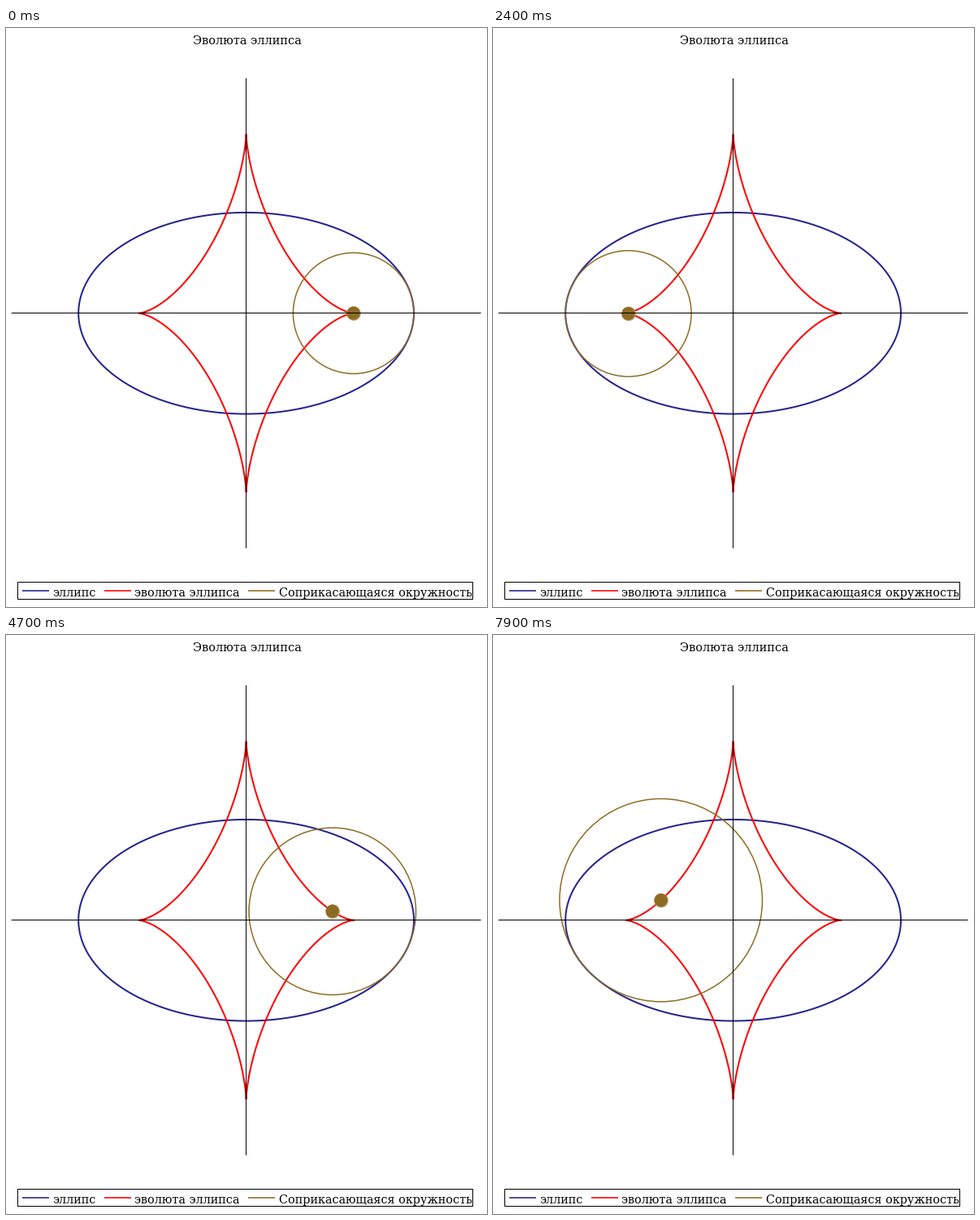
A matplotlib script for the animation above (8 s loop, 592 px wide and 712 px high).

```python
import numpy as np
import matplotlib.pyplot as plt
from matplotlib.animation import FuncAnimation
from matplotlib.patches import Circle, Rectangle

W, H, DPI = 592, 712, 64
PX = 72 / DPI                      # points per pixel
NAVY, RED, SIENNA = "#23238e", "#ff0000", "#8e6b23"
CX, CY, UNIT = 295.6, 350.75, 41.28
A, B = 5, 3                        # semi-axes of the ellipse
FRAMES, TURN = 80, 50              # frames per loop, frames per revolution

fig = plt.figure(figsize=(W / DPI, H / DPI), dpi=DPI, facecolor="white")
ax = fig.add_axes([0, 0, 1, 1])
ax.set(xlim=(0, W), ylim=(H, 0))
ax.axis("off")


def to_px(x, y):
    return CX + UNIT * x, CY - UNIT * y


def line(x, y, color, width, **kw):
    return ax.plot(x, y, color=color, lw=width * PX, **kw)[0]


def label(x, y, text, size, **kw):
    ax.text(x, y, text, family="DejaVu Serif", size=size * PX,
            color="black", va="baseline", **kw)


def ellipse(t):
    return A * np.cos(t), B * np.sin(t)


def evolute(t):
    c2 = A**2 - B**2
    return c2 / A * np.cos(t)**3, -c2 / B * np.sin(t)**3


def radius(t):
    return ((A * np.sin(t))**2 + (B * np.cos(t))**2)**1.5 / (A * B)


# Fixed curves and axes
s = np.linspace(0, 2 * np.pi, 401)
line(*to_px(*ellipse(s)), NAVY, 2, zorder=2)
line(*to_px(*evolute(s)), RED, 2, zorder=2, solid_joinstyle="bevel")
reach = 7 * UNIT
axis_style = dict(zorder=6, solid_capstyle="butt", snap=False)
line([CX - reach, CX + reach], [350.5, 350.5], "black", 1, **axis_style)
line([295.5, 295.5], [CY - reach, CY + reach], "black", 1, **axis_style)

# Title and legend
label(297, 20, "Эволюта эллипса", 14.5, ha="center")
ax.add_patch(Rectangle((14.5, 681.5), 560, 21, fill=False, ec="black",
                       lw=PX, snap=False))
for x, color, text in [(19.5, NAVY, "эллипс"),
                       (120.5, RED, "эволюта эллипса"),
                       (297.5, SIENNA, "Соприкасающаяся окружность")]:
    line([x, x + 33.5], [692, 692], color, 1.6, solid_capstyle="butt")
    label(x + 38, 699, text, 14.4, ha="left")

# Moving osculating circle with its centre
view = Rectangle((5, 59), 582, 583, transform=ax.transData)
ring = Circle((0, 0), 1, fill=False, ec=SIENNA, lw=1.5 * PX, zorder=3)
rim = Circle((0, 0), 8.8, fc="#b39c6a", ec="none", zorder=4)
core = Circle((0, 0), 8, fc=SIENNA, ec="none", zorder=5)
for patch in (ring, rim, core):
    ax.add_patch(patch)
ring.set_clip_path(view)


def update(i):
    t = 2 * np.pi * (i % TURN) / TURN
    x, y = to_px(*evolute(t))
    ring.center = x, y
    ring.set_radius(radius(t) * UNIT)
    rim.center = x + 0.3, y + 0.3
    core.center = x - 0.1, y - 0.1
    return ring, rim, core


anim = FuncAnimation(fig, update, frames=FRAMES, interval=100,
                     repeat=True, repeat_delay=0, blit=False)
plt.show()
```
